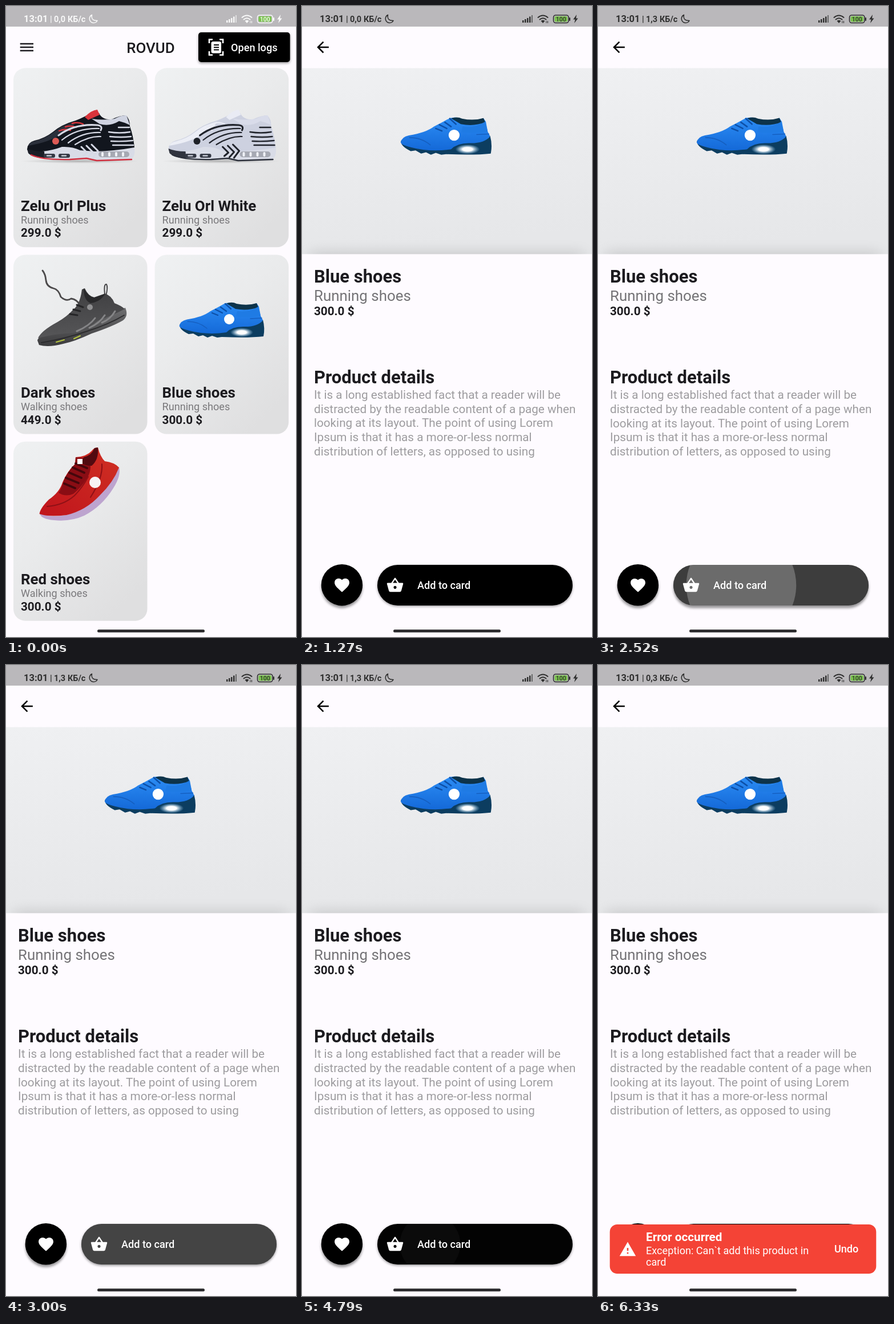
An HTML page for the animation above (6450 ms loop, 508 by 1102 pixels).

```html
<!DOCTYPE html>
<html lang="en">
<head>
<meta charset="utf-8">
<title>Shop demo</title>
<style>
html, body { margin: 0; width: 100%; height: 100%; overflow: hidden; background: #fefbff; }
svg { display: block; width: 100vw; height: 100vh; font-family: Roboto, sans-serif; }
.line { fill: none; stroke-linecap: round; stroke-linejoin: round; }
.night { --light: #2b303b; --body: #12161e; --trim: #d6d9e5; --tongue: #d8343b; --collar: #cfd3e1; --logo: #dd5a55; --base: #cf2f3f; --toe: #1b1f28; }
.snow { --light: #eceef6; --body: #cdd1e0; --trim: #20232b; --tongue: #e9ebf4; --collar: #d9dcea; --logo: #1d2027; --base: #2c303b; --toe: #30343f; }
</style>
</head>
<body>
<svg id="stage" viewBox="0 0 508 1102"></svg>
<script>
const LOOP = 6450, INK = '#1c1b1f';

const clamp = v => Math.max(0, Math.min(1, v));
const mix = (a, b, k) => a + (b - a) * k;
const span = (t, a, b) => clamp((t - a) / (b - a));

function bezier(x1, y1, x2, y2) {
  const at = (a, b, s) => 3 * a * (1 - s) ** 2 * s + 3 * b * (1 - s) * s * s + s ** 3;
  return x => {
    let lo = 0, hi = 1;
    for (let i = 0; i < 24; i++) {
      const mid = (lo + hi) / 2;
      if (at(x1, x2, mid) < x) lo = mid; else hi = mid;
    }
    return at(y1, y2, hi);
  };
}
const ease = bezier(.25, .1, .25, 1);
const quart = bezier(.77, 0, .175, 1);
const zoomIn = bezier(.3, 0, .8, .15), zoomOut = bezier(.05, .7, .1, 1);
const zoom = x => x < 1 / 6 ? .4 * zoomIn(x * 6) : .4 + .6 * zoomOut((x - 1 / 6) * 1.2);

const text = (x, y, size, weight, fill, str, extra = '') =>
  `<text x="${x}" y="${y}" font-size="${size}" font-weight="${weight}" fill="${fill}" ${extra}>${str}</text>`;
const icon = (x, y, d, fill = '#fff') =>
  `<path transform="translate(${x} ${y}) scale(1.293)" fill="${fill}" fill-rule="evenodd" d="${d}"/>`;
const line = (d, stroke, width, extra = '') =>
  `<path class="line" d="${d}" stroke="${stroke}" stroke-width="${width}" ${extra}/>`;
const shade = (id, from, to, dir = 'x1="0" y1="0" x2="0" y2="1"') =>
  `<linearGradient id="${id}" ${dir}><stop offset="0" style="stop-color:${from}"/><stop offset="1" style="stop-color:${to}"/></linearGradient>`;
// Black box with a soft shadow below it
const raised = (x, y, w, h, r, drop, id = '') =>
  `<rect ${id && `id="${id}"`} x="${x}" y="${y + drop}" width="${w}" height="${h}" rx="${r}" opacity=".4" filter="url(#soft)"/>
  <rect x="${x}" y="${y}" width="${w}" height="${h}" rx="${r}"/>`;

const defs = `<defs>
<filter id="soft" x="-20%" y="-20%" width="140%" height="150%"><feGaussianBlur stdDeviation="2.2"/></filter>
<filter id="haze" x="-10%" y="-60%" width="120%" height="220%"><feGaussianBlur stdDeviation="13"/></filter>
<linearGradient id="cardBg" x1="0" y1="0" x2=".7" y2="1"><stop offset="0" stop-color="#eff1f2"/><stop offset=".45" stop-color="#eaebec"/><stop offset="1" stop-color="#dfdfe0"/></linearGradient>
${shade('photoBg', '#eff0f2', '#e6e7e9', 'x1="0" y1="0" x2=".15" y2="1"')}
${shade('blue', '#2c8df5', '#1469d8')}
${shade('red', '#c0141c', '#cf3023', 'x1="0" y1="1" x2="1" y2="0"')}
${shade('dark', '#3f3f41', '#565658')}
${shade('sole', '#6f6f71', '#3b3b3d')}
<radialGradient id="glow"><stop offset=".4" stop-color="#fff"/><stop offset="1" stop-color="#9fd2f5" stop-opacity="0"/></radialGradient>
<radialGradient id="ground"><stop offset="0" stop-color="#777" stop-opacity=".5"/><stop offset="1" stop-color="#888" stop-opacity="0"/></radialGradient>
<clipPath id="pill"><rect x="132" y="976" width="342" height="71" rx="35.5"/></clipPath>
<clipPath id="reveal"><rect id="window" x="0" y="970" width="508" height="112"/></clipPath>

<g id="runner">
  <ellipse cx="129" cy="271" rx="104" ry="4" fill="url(#ground)"/>
  <path fill="var(--body)" d="M37 250Q38 238 50 235Q68 231 82 220Q97 207 122 200Q140 193 149 186L163 187Q168 199 185 198Q200 191 210 191Q217 197 217 210Q223 227 225 247L221 260H60Q38 258 37 250Z"/>
  <path fill="var(--light)" d="M39 244Q40 238 51 236Q70 231 84 220Q98 208 122 202Q118 213 98 223Q76 238 39 244Z"/>
  <path fill="var(--tongue)" d="M138 194Q149 182 160 181L164 190L144 199Z"/>
  <path fill="var(--collar)" d="M150 197Q171 200 190 197Q203 190 211 191L217 208Q207 203 198 201Q182 211 164 206Z"/>
  ${line('M93 218Q103 214 113 217M104 211Q114 208 123 212M116 205Q125 202 135 206', 'var(--tongue)', 2.4)}
  ${line('M92 226Q120 205 160 208Q170 209 166 217', 'var(--trim)', 3)}
  ${line('M98 234Q124 213 163 214M109 239Q134 220 165 221M121 242Q145 227 166 228', 'var(--trim)', 2.2)}
  ${line('M180 220Q199 223 217 220M182 228Q202 230 219 228M184 236Q205 237 222 235M187 243H223M197 212H216', 'var(--trim)', 2.4)}
  <path fill="#d9dce7" d="M64 254Q82 252 98 246Q116 245 130 252L156 254Q192 253 225 247Q227 262 220 267L158 270L142 265L111 268L66 266Q58 260 64 254Z"/>
  <path fill="var(--toe)" d="M37 249Q49 254 67 254L68 266Q47 265 39 257Z"/>
  ${line('M132 246L142 256L135 262M141 244L152 255L144 264M150 242L161 253L152 265', 'var(--trim)', 3)}
  ${line('M44 260Q63 269 112 268L141 266L159 270L220 268', 'var(--base)', 2.4)}
  <rect x="66" y="258" width="20" height="7" rx="3" fill="#343844"/><rect x="92" y="258" width="20" height="7" rx="3" fill="#343844"/>
  ${line('M72 261.500H79M98 261.500H105', '#c4c7d2', 2.5)}
  <rect x="162" y="254" width="54" height="10" rx="5" fill="#a6a9b3"/>
  ${line('M169 257V261M181 257V261M193 257V261M205 257V261', '#f0f2f7', 4)}
  <circle cx="87" cy="236" r="6" fill="var(--logo)"/>
</g>

<g id="walker">
  ${line('M130 523Q124 512 114 511Q106 517 96 508Q92 495 83 493Q71 490 70 479T64 462', '#4c4a4b', 2.8)}
  ${line('M173 503Q171 485 176 486Q179 491 175 506', '#454547', 2)}
  <path fill="url(#sole)" d="M55 584Q58 574 80 570Q130 562 209 527Q215 541 205 549Q186 560 150 572Q120 586 100 590Q74 597 58 592Z"/>
  <path fill="url(#dark)" d="M56 580Q62 567 90 552Q106 543 117 531Q130 521 133 495L138 493Q144 507 155 509Q166 508 173 502Q186 507 190 519Q201 523 208 529Q188 540 160 550Q142 566 118 571Q86 572 56 580Z"/>
  <path fill="#29292b" d="M136 493Q145 508 154 509L174 502Q166 517 148 519Q136 514 136 493Z"/>
  ${line('M124 568Q147 558 156 545M146 562Q164 554 173 540M168 553Q183 547 191 533', '#858587', 3)}
  ${line('M62 588Q104 581 142 568Q180 556 207 540', '#2c2c2e', 2)}
  ${line('M112 538L125 540M118 530L130 533M124 522L135 526', '#252527', 3)}
  ${line('M88 587L102 583M119 581L130 576', '#b5c43d', 2)}
  <circle cx="147" cy="526" r="5" fill="#8f8f91"/>
</g>

<g id="sprinter">
  <path fill="#0c3d60" d="M304 556Q318 566 350 568L386 562L450 548Q454 563 451 577Q425 580 378 578L370 579L361 576L353 579L345 575L337 577L328 572L320 573Q303 565 304 556Z"/>
  <path fill="url(#blue)" d="M303.500 559Q305 550 317 547.500Q345 543 358 533Q372 526 384 519L393 518Q400 525 414 527Q429 523 439 519L443 525L446 541L450 549Q440 561 415 560Q396 560 386 570Q352 575 321 567Q305 563 303.500 559Z"/>
  <path fill="#0d334a" d="M386 519.500Q396 516 404 520Q423 524 439 519L442 526Q424 533 402 529Z"/>
  <path fill="#1f7be4" d="M405 533Q425 536 442 525L446 541Q424 545 403 542Z"/>
  ${line('M361 536L371 540M367 530L379 536M376 526L386 533M384 520L394 529', '#0d50a8', 2.4)}
  ${line('M318 551Q338 551 352 563M428 546L448 545', '#155fc0', 1.5)}
  <ellipse cx="413" cy="570" rx="20" ry="8" fill="url(#glow)"/>
  <circle cx="391" cy="547" r="9" fill="#fff"/>
</g>

<g id="racer">
  <path fill="#bda4cf" d="M59 886Q75 894 105 889Q140 880 164 852Q184 832 198 805Q202 820 188 842Q168 874 137 890Q113 901 84 898Q61 896 59 886Z"/>
  <path fill="url(#red)" d="M58.500 887Q60 877 75 862Q94 849 99 832Q107 813 121 800L122 788Q141 787 150 777Q154 771 161 771Q165 787 173 795Q190 797 198 806Q188 832 164 855Q140 881 106 889Q75 893 58.500 887Z"/>
  <path fill="#8a0d14" d="M122 788L145 790Q152 806 143 823Q131 842 118 852Q104 858 92 850Q98 842 101 829Q109 811 121 800Z"/>
  <path fill="#520a10" d="M136 788Q150 785 155 772L161 771Q163 792 150 803Q139 803 132 798Z"/>
  ${line('M102 834L121 842M105 824L127 833M111 815L132 824M117 806L137 815M122 799L142 807', '#45070c', 4)}
  ${line('M72 874Q101 872 120 855Q134 841 144 822M168 800Q170 824 148 858', '#8f1016', 2)}
  <rect x="125" y="791" width="9" height="9" fill="#fff"/>
  <circle cx="156" cy="832" r="10" fill="#f7f3f5"/>
</g>
</defs>`;

const goods = [
  ['Zelu Orl Plus', 'Running', '299.0', 'runner', 'night'],
  ['Zelu Orl White', 'Running', '299.0', 'runner', 'snow'],
  ['Dark shoes', 'Walking', '449.0', 'walker'],
  ['Blue shoes', 'Running', '300.0', 'sprinter'],
  ['Red shoes', 'Walking', '300.0', 'racer'],
];

const card = ([name, kind, price, shoe, tone = ''], i) => {
  const x = 13 + i % 2 * 247.6, y = 108.3 + (i >> 1) * 326.2;
  return `<rect x="${x}" y="${y}" width="234.5" height="313" rx="20.7" fill="url(#cardBg)"/>
    <use href="#${shoe}" class="${tone}" x="${tone === 'snow' ? 247.5 : 0}"/>` +
    text(x + 13, y + 249.7, 25.9, 700, INK, name) +
    text(x + 13, y + 271.7, 18.1, 400, '#7a797c', kind + ' shoes') +
    text(x + 13, y + 295, 20.7, 700, INK, price + ' $');
};

const listPage = `<g id="list"><rect width="508" height="1102" fill="#fefbff"/>
  <path d="M24.7 66H48M24.7 72H48M24.7 78H48" stroke="${INK}" stroke-width="2.6"/>
  ${text(253.4, 82, 25.9, 500, INK, 'ROVUD', 'text-anchor="middle"')}
  ${raised(337, 46, 160.5, 52, 5, 2)}
  <path d="M356 65V58.5H362M374 58.5H380V65M380 79V85.5H374M362 85.5H356V79" fill="none" stroke="#fff" stroke-width="2.6"/>
  <rect x="359.5" y="62" width="17.5" height="20.5" rx="3" fill="#fff"/>
  <path d="M364 68H373M364 72.3H373M364 76.6H373" stroke="#000" stroke-width="2"/>
  ${text(394, 78.7, 18.1, 500, '#fff', 'Open logs')}
  ${goods.map(card).join('')}</g>`;

const story = ['It is a long established fact that a reader will be',
  'distracted by the readable content of a page when',
  'looking at its layout. The point of using Lorem',
  'Ipsum is that it has a more-or-less normal',
  'distribution of letters, as opposed to using'];

const heart = 'M12 21.35l-1.45-1.32C5.4 15.36 2 12.28 2 8.5 2 5.42 4.42 3 7.5 3c1.74 0 3.41.81 4.5 2.09C13.09 3.81 14.76 3 16.5 3 19.58 3 22 5.42 22 8.5c0 3.78-3.4 6.86-8.55 11.54L12 21.35z';
const basket = 'M17.21 9l-4.38-6.56c-.19-.28-.51-.42-.83-.42-.32 0-.64.14-.83.43L6.79 9H2c-.55 0-1 .45-1 1 0 .09.01.18.04.27l2.54 9.27c.23.84 1 1.46 1.92 1.46h13c.92 0 1.69-.62 1.93-1.46l2.54-9.27L23 10c0-.55-.45-1-1-1h-4.79zM9 9l3-4.4L15 9H9zm3 8c-1.1 0-2-.9-2-2s.9-2 2-2 2 .9 2 2-.9 2-2 2z';
const warning = 'M1 21h22L12 2 1 21zm12-3h-2v-2h2v2zm0-4h-2v-4h2v4z';
const arrow = 'M20 11H7.83l5.59-5.59L12 4l-8 8 8 8 1.41-1.41L7.83 13H20v-2z';

const detailPage = `<g id="detail"><rect width="508" height="1102" fill="#fefbff"/>
  ${icon(21, 56.5, arrow, '#000')}
  <rect y="108.5" width="508" height="325" fill="url(#photoBg)"/>
  <rect x="14" y="433.5" width="480" height="60" opacity=".17" filter="url(#haze)"/>
  <rect y="433.5" width="508" height="668.5" fill="#fefbff"/>
  <use href="#sprinter" transform="translate(252.2 227.5) scale(1.07) translate(-377.7 -548.8)"/>
  ${text(21, 483, 31, 700, INK, 'Blue shoes')}
  ${text(21, 515, 25.9, 400, '#757477', 'Running shoes')}
  ${text(21, 540, 20.7, 700, INK, '300.0 $')}
  ${text(21, 659, 31, 700, INK, 'Product details')}
  ${story.map((s, i) => text(21, 686.3 + i * 24.6, 20.7, 400, '#9d9c9f', s)).join('')}
  ${raised(33.7, 975, 72.4, 72.4, 36.2, 4)}
  ${icon(54.5, 996, heart)}
  ${raised(132, 976, 342, 71, 35.5, 1.5, 'shadow')}
  <g clip-path="url(#pill)" fill="#fff">
    <rect id="tint" x="132" y="976" width="342" height="71"/><circle id="ripple" cy="1011.5"/>
  </g>
  ${icon(147.5, 996, basket)}
  ${text(202, 1017.7, 18.1, 500, '#fff', 'Add to card')}</g>`;

const snackBar = `<g id="snack" clip-path="url(#reveal)"><g id="slide">
  <rect x="20.7" y="977" width="466.6" height="86" rx="13" fill="#f44336"/>
  ${icon(36.5, 1005, warning)}
  ${text(84, 1006, 20.7, 700, '#fff', 'Error occurred')}
  ${text(84, 1028.5, 18.1, 400, '#fff', 'Exception: Can`t add this product in')}
  ${text(84, 1049.2, 18.1, 400, '#fff', 'card')}
  ${text(414, 1026, 18.1, 500, '#fff', 'Undo')}</g></g>`;

const statusBar = `<rect width="508" height="36" fill="#bab8bb"/>
  <g id="status" fill="currentColor">
  ${text(31, 28, 16.5, 700, 'currentColor', '13:01')}
  ${text(77, 28, 14.5, 700, 'currentColor', '| <tspan id="speed" x="84"></tspan><tspan x="108">КБ/с</tspan>')}
  ${line('M150.5 15.5A7.3 7.3 0 1 0 160 25.5Q148.5 26 150.5 15.5Z', 'currentColor', 1.5)}
  <path d="M386 25h2.5v4h-2.5zM390 23h2.5v6h-2.5zM394 21h2.5v8h-2.5zM398 18.5h2.5v10.5h-2.5z"/>
  <path opacity=".6" d="M402 16h2v13h-2z"/>
  ${line('M413.5 20Q422 13 430.5 20M416.5 23.5Q422 19 427.5 23.5', 'currentColor', 2)}
  <path d="M418.5 26Q422 23.5 425.5 26L422 30Z"/><path d="M427.5 26h1v4h-1zM430 26h1v4h-1z"/>
  <rect x="440.5" y="16" width="26.5" height="13.5" rx="4" fill="none" stroke="currentColor" stroke-width="1.6"/>
  <rect x="442.5" y="18" width="22.5" height="9.5" rx="2" fill="#79c34c"/>
  <rect x="468" y="20" width="2" height="6" rx="1"/>
  ${text(453.8, 26.7, 10.5, 500, 'currentColor', '100', 'text-anchor="middle"')}
  <path d="M481 15L475 23.5H478.5L477 30L483.5 21.5H480Z"/></g>
  <rect x="160" y="1089" width="188" height="5" rx="2.5" fill="#2f2e31"/>`;

const $ = id => document.getElementById(id);
$('stage').innerHTML = defs + listPage + '<rect id="scrim" width="508" height="1102"/>' +
  detailPage + snackBar + statusBar;

const set = (id, attrs) => { for (const k in attrs) $(id).setAttribute(k, attrs[k]); };
const scaled = s => `translate(254 551) scale(${s}) translate(-254 -551)`;

function drawPages(t) {
  const p = span(t, 986, 1286), z = zoom(p);
  set('list', { transform: scaled(1 + .05 * z) });
  set('scrim', { opacity: .6 * span(p, .2075, .4175) });
  set('detail', { transform: scaled(.85 + .15 * z), opacity: span(p, .15, .27) });
  const c = Math.round(mix(248, 48, span(t, 1120, 1250)));
  $('status').style.color = `rgb(${c},${c},${c})`;
  $('speed').textContent = t < 2060 ? '0,0' : t < 6060 ? '1,3' : '0,3';
}

function drawButton(t) {
  const [down, up] = t < 4500 ? [2300, 2830] : [4780, 5195];
  const tint = span(t, down, down + 200) * (1 - span(t, up, up + 200));
  const ink = span(t, down, down + 75) * (1 - span(t, up + 225, up + 375));
  const grow = ease(clamp((Math.min(t, up) - down) / 1000 + Math.max(0, t - up) / 225));
  set('tint', { opacity: .24 * tint });
  set('ripple', { opacity: .24 * ink, cx: mix(224, 303, grow), r: mix(52.5, 181, grow) });
  set('shadow', { y: 977.5 + 3 * tint });
}

function drawSnack(t) {
  const [start, end] = t < 4500 ? [3110, 3360] : [5380, 5630];
  const p = span(t, start, end), fade = span(p, .4, .6);
  const top = 1082 - 112 * quart(p);
  const swipe = t >= 4120 && t < 4500 ? 106 * span(t, 4080, 4360) ** 1.33 : 0;
  set('window', { y: top, height: 1082 - top });
  set('snack', { opacity: 1 - Math.sqrt(1 - fade * fade) });
  set('slide', { transform: `translate(0 ${swipe})` });
}

function frame() {
  const t = Math.floor(performance.now() % LOOP / 10) * 10;
  drawPages(t);
  drawButton(t);
  drawSnack(t);
  requestAnimationFrame(frame);
}
frame();
</script>
</body>
</html>
```
